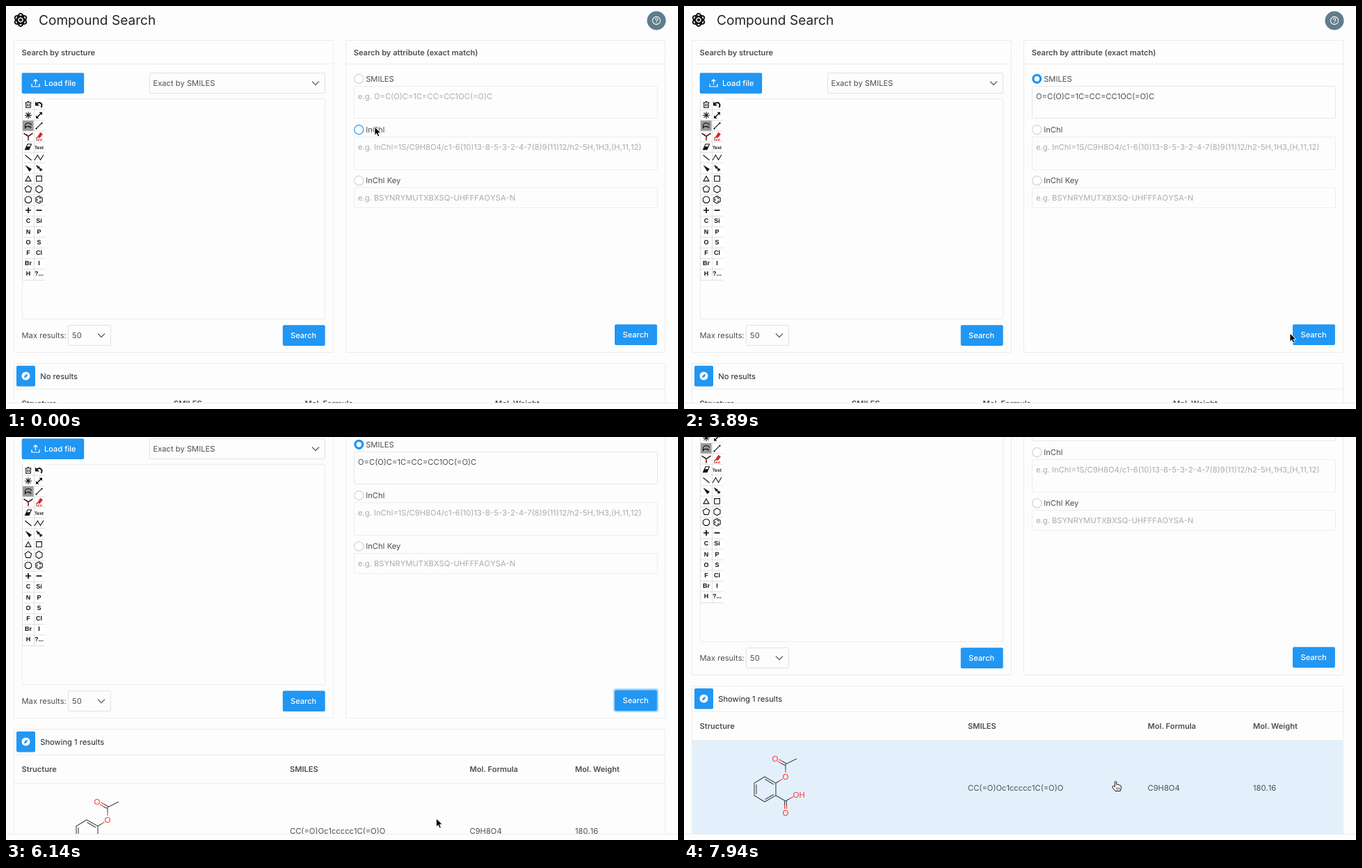
Animation, 966 px wide and 580 px high, one loop 7.96 s. Source, as an HTML page:

```html
<!DOCTYPE html>
<html lang="en">
<head>
<meta charset="utf-8">
<title>Compound Search</title>
<style>
  html, body { margin: 0; width: 100%; height: 100%; overflow: hidden; background: #fdfdfd; }
  svg { display: block; }
  text { font: 11.2px Inter, sans-serif; fill: #495057; white-space: pre; text-rendering: geometricPrecision; }
  .bold { font-weight: 600; font-size: 11.1px; }
  .title { font-size: 19.1px; fill: #212529; }
  .dark { fill: #212529; }
  .white { fill: #fff; font-weight: 500; font-size: 11.1px; }
  .hint { fill: #a7acb1; }
  .hint, .formula { font-kerning: none; }
  .atom { font: bold 9px "Liberation Sans", Arial, sans-serif; fill: #111; text-anchor: middle; }
  .oxygen { font: 11.5px "Liberation Sans", Arial, sans-serif; fill: #f33; }
</style>
</head>
<body>
<svg id="stage" width="966" height="580" viewBox="0 0 966 580"></svg>
<script>
const LOOP = 7960;
const BLUE = '#2196f3';
const stage = document.getElementById('stage');

// ---- drawing helpers ----
const text = (x, y, s, cls = '', id = '') => `<text x="${x}" y="${y}" class="${cls}" id="${id}">${s}</text>`;
const box = (x, y, w, h, stroke = '#ececee', fill = 'none', id = '') =>
  `<rect x="${x + .5}" y="${y + .5}" width="${w - 1}" height="${h - 1}" rx="1.5" stroke="${stroke}" fill="${fill}" id="${id}"/>`;
const path = (d, color = '#111', width = 1.1, fill = 'none') =>
  `<path d="${d}" stroke="${color}" stroke-width="${width}" fill="${fill}"/>`;
const solid = d => path(d, 'none', 0, '#111');
const at = (x, y, body) => `<g transform="translate(${x} ${y})">${body}</g>`;
const chevron = (x, y) => at(x, y, path('M-5 -2.5L0 2.5 5 -2.5', '#5d656d', 1.3));
const button = (x, y, w, label, labelX, id = '') =>
  `<rect id="${id}" x="${x}" y="${y}" width="${w}" height="29.7" rx="2" fill="${BLUE}"/>` + text(labelX, y + 19, label, 'white');
const radio = (y, label, id) =>
  `<circle id="${id}" cx="507.3" cy="${y}" r="6.6" fill="#fff" stroke="#ced4da" stroke-width="1.2"/>` + text(517.2, y + 4, label);
const polygon = (n, r, turn = 0) => {
  const points = Array.from({ length: n }, (_, i) => {
    const a = (i + turn) / n * 2 * Math.PI - Math.PI / 2;
    return `${(r * Math.cos(a)).toFixed(2)} ${(r * Math.sin(a)).toFixed(2)}`;
  });
  return path(`M${points.join('L')}Z`);
};

function palette() {
  const letter = (s, size = 9) => `<text class="atom" y="3.2" style="font-size:${size}px">${s}</text>`;
  const cells = [
    path('M-4.5 -3H4.5M-3.3 -3V4.3H3.3V-3M-1.5 -4.5H1.5M-1.2 -1V2.5M1.2 -1V2.5'),
    solid('M-5.5 1.5V-4.5L.5 1.5Z') + path('M-3 -1.5C1 -5 6 -1 3 4', '#111', 2),
    path('M-5 0H5M0 -5V5M-3.5 -3.5L3.5 3.5M-3.5 3.5L3.5 -3.5'),
    path('M-3 3L3 -3', '#111', 1.6) + solid('M4.5 -4.5V0L0 -4.5ZM-4.5 4.5V0L0 4.5Z'),
    path('M-4.5 4V0C-5 -5 4.5 -5 4.5 -1M-4.5 3C-3 0 0 1 1 2') + solid('M0 -1L5 2 3 2.5 4 5Z'),
    path('M-4 4L4 -4') + solid('M-5 3h2v2h-2zM3 -5h2v2h-2z'),
    path('M-6.5 -4.5L0 0 6.5 -4.5M0 0V6', '#111', 1.3) + path('M-2 -3L0 0V5', '#d22', 1),
    path('M-2 1L2 -5.5 5 -3 1 2Z', '#d22', .8, '#d22') + path('M-2 1L-4 3') +
      '<text class="atom" y="6" style="font-size:4px;fill:#d22">NEW</text>',
    path('M-4.5 4L-1 -4H4.5L1 4Z') + solid('M-4.5 4L-2.5 -.5H3L1 4Z'),
    letter('Text', 6.5),
    path('M-4.5 -3.5L4.5 4'),
    path('M-6.5 4L-2 -3.5 2 3.5 6.5 -4'),
    solid('M-4.5 -4.5L5 1.5 1.5 5Z'),
    path('M-4 -4L4.5 3.5') + solid('M-4 -4L1.5 -1.5 -1.5 1.5ZM0 0L5 1.5 1.5 5Z'),
    path('M0 -3.5L4 3.5H-4Z'),
    path('M-3.8 -3.8H3.8V3.8H-3.8Z'),
    polygon(5, 5), polygon(6, 5.2), polygon(8, 5, .5),
    polygon(6, 5.4) + path('M-2.8 -1.6V1.6M0 -3.2L2.8 -1.6M0 3.2L2.8 1.6'),
    path('M-4 0H4M0 -4V4', '#111', 1.7), path('M-4 0H4', '#111', 1.7),
    ...'C Si N P O S F Cl Br I H ?...'.split(' ').map(s => letter(s))
  ];
  let grid = 'M23.5 133V394.5H56M40.5 133V394';
  for (let row = 1; row < 17; row++) grid += `M23 ${134 + row * 15.3}H56`;
  return `<path d="M23 133H56V394H23Z" fill="#fff"/><path d="M24 165H39.5V180H24Z" fill="#999"/>` +
    path(grid, '#d8d8d8', .8) +
    cells.map((icon, i) => at(i % 2 ? 47.5 : 32, 142 + 15.2 * (i >> 1), icon)).join('');
}

function molecule() {
  const grey = d => path(d, '#444', 1.1);
  const red = d => path(d, '#f33', 1.1);
  return grey('M116 645L132 654V672L116 681 101 672V654ZM104 670V656M116.5 648.5L129 656M129 670.5L116.5 677.5') +
    grey('M132 654L137 651M146 627V634M146 627L162 619M146.8 625.8L141 622.5M145.2 628.6L139.5 625.4') +
    red('M137 651L141.5 648.3M146 634V639M141 622.5L136.5 620M139.5 625.4L135 622.8') +
    grey('M132 672L146 680M146 680L152 676.5M144.6 680V686M147.4 680V686') +
    red('M152 676.5L157 673.7M144.6 686V691M147.4 686V691') +
    text(126.6, 623, 'O', 'oxygen') + text(141.6, 649, 'O', 'oxygen') +
    text(156.5, 675, 'OH', 'oxygen') + text(141.6, 701, 'O', 'oxygen');
}

const headings = xs => ['Structure', 'SMILES', 'Mol. Formula', 'Mol. Weight']
  .map((s, i) => text(xs[i], 576, s, 'bold')).join('');
const electrons = [0, 60, 120].map(a =>
  `<ellipse rx="4.6" ry="9.2" transform="rotate(${a})" fill="none" stroke="#111" stroke-width="2"/>`).join('');

stage.innerHTML = `
<clipPath id="view"><path d="M0 0H966V571H0Z"/></clipPath>
<g clip-path="url(#view)"><g id="page">
  ${at(21, 20, electrons + '<circle r="2.2" fill="#111"/>')}
  ${text(47, 27, 'Compound Search', 'title')}
  <circle cx="935" cy="21" r="13.5" fill="#607d8b"/>
  <circle cx="935" cy="21" r="5.6" fill="none" stroke="#fff" stroke-width="1.1"/>
  ${path('M933.2 19.8C933.2 17.2 936.8 17.2 936.8 19.6C936.8 21 935 21 935 22.3M935 23.3V24.5', '#fff')}

  ${box(11, 49, 460, 450)}${box(11, 49, 460, 35)}
  ${box(488, 49, 460, 450)}${box(488, 49, 460, 35)}
  ${text(22.5, 71, 'Search by structure', 'bold')}
  ${text(499.7, 71, 'Search by attribute (exact match)', 'bold')}
  ${button(22.7, 96.3, 89.5, 'Load file', 55)}
  ${at(42.5, 111, path('M0 2V-5M-3 -2.3L0 -5.3 3 -2.3M-5.5 1V5H5.5V1', '#fff', 1.2))}
  ${box(206, 96, 253, 30, '#e0e2e5')}${text(211.5, 115, 'Exact by SMILES')}${chevron(445, 111)}
  ${box(23, 133, 436, 318)}${palette()}
  ${text(22.5, 478, 'Max results:')}
  ${box(89, 459, 62, 30, '#e0e2e5')}${text(95, 478, '50')}${chevron(137, 474)}
  ${button(397.8, 459.2, 60.9, 'Search', 409)}

  ${radio(104.8, 'SMILES', 'smilesRadio')}${radio(178, 'InChI', 'inchiRadio')}${radio(251.3, 'InChI Key', 'keyRadio')}
  <rect id="fieldRing" x="499" y="114" width="439" height="49" rx="3" fill="none" stroke="#a6d5fa" stroke-width="2.2"/>
  ${box(500, 115, 437, 47, '#ebedef', '#fdfdfd', 'field')}
  ${text(506, 134, '', 'formula', 'fieldText')}
  ${box(500, 188, 437, 48, '#ebedef')}
  ${text(506, 207, 'e.g. InChI=1S/C9H8O4/c1-6(10)13-8-5-3-2-4-7(8)9(11)12/h2-5H,1H3,(H,11,12)', 'hint')}
  ${box(500, 261, 437, 30, '#ebedef')}
  ${text(506, 280, 'e.g. BSYNRYMUTXBXSQ-UHFFFAOYSA-N', 'hint')}
  <rect id="buttonRing" x="874" y="457" width="63" height="32" rx="3" fill="none" stroke="#a6d5fa" stroke-width="2.2"/>
  ${button(875, 458.3, 60.9, 'Search', 886.5, 'searchButton')}

  <rect id="resultRow" x="11" y="592" width="937" height="138"/>
  ${box(11, 514, 937, 216, '#ececee', 'none', 'resultBox')}${path('M11 551.5H948', '#ececee', 1)}
  <rect x="15" y="517.7" width="27" height="29.7" rx="2" fill="${BLUE}"/>
  ${at(28.5, 532.5, `<circle r="6" fill="#fff"/>` + path('M3 -3L1.2 1.2 -3 3 -1.2 -1.2Z', 'none', 0, BLUE))}
  ${text(49.3, 537, '', 'dark', 'summary')}
  <g id="emptyTable">${headings([22.5, 241, 429.5, 703])}</g>
  <g id="spinner" transform="translate(479.5 570) scale(.75)">
    <circle id="arc" r="20" fill="none" stroke-width="7.5" stroke-linecap="round"/>
  </g>
  <g id="fullTable">
    ${headings([22.5, 408, 666.5, 818])}${path('M11 592.5H948', '#ececee', 1)}
    ${molecule()}
    ${text(408, 665, 'CC(=O)Oc1ccccc1C(=O)O', 'formula')}${text(666.5, 665, 'C9H8O4')}${text(818, 665, '180.16', 'formula')}
  </g>
</g></g>
${path('M0 571.5H966', '#ececee', 1)}
<g id="pointer">
  <g id="arrow">${path('M0 0V12.2L2.8 9.6 4.7 14 6.9 13 5 8.8H8.8Z', '#fff', .9, '#000')}</g>
  <g id="beam">${path('M-2 -6Q0 -6 0 -4V4Q0 6 -2 6M2 -6Q0 -6 0 -4V4Q0 6 2 6', '#222', 1)}</g>
  <g id="hand">${path('M-1.2 8.5V1.2Q0 -.4 1.2 1.2V5.2Q2.5 4.4 3.4 5.6 4.8 5 5.6 6.2 7.6 5.8 7.8 7.8V10.5L6.6 14.5H-.5L-4.8 9Q-4.6 6.8 -2.8 7.4Z', '#111', 1, '#fff')}
    ${path('M1.4 9.5V12.5M3.4 9.5V12.5M5.4 9.5V12.5', '#111', .8)}</g>
</g>`;

// ---- timeline ----
const pointerKeys = [
  [0, 530, 174], [150, 530, 174], [450, 531, 160], [900, 523, 100], [1200, 522, 98],
  [1350, 530, 110], [1500, 560, 128], [1650, 566, 130], [2100, 566, 130], [2250, 600, 150],
  [2400, 650, 195], [2540, 685, 236], [2690, 690, 300], [2840, 685, 380], [2990, 674, 437],
  [3140, 678, 440], [3290, 705, 450], [3590, 810, 465], [3890, 871, 471], [4190, 880, 472],
  [4340, 879, 473], [4640, 770, 505], [4940, 618, 549], [7190, 619, 549], [7490, 607, 538],
  [7790, 607, 538], [7940, 620.5, 495]
];
const scrollKeys = [
  [4790, 0], [5090, 20], [5540, 20], [5690, 34], [6140, 94], [6440, 140], [6740, 160], [7190, 160], [7490, 156]
];

function valueAt(keys, t, i = 1) {
  const next = keys.findIndex(k => k[0] > t);
  if (next === 0) return keys[0][i];
  if (next < 0) return keys[keys.length - 1][i];
  const a = keys[next - 1], b = keys[next];
  return a[i] + (b[i] - a[i]) * (t - a[0]) / (b[0] - a[0]);
}

function stepped(t) {
  if (t < 300) return 0;
  const start = t < 2540 ? 0 : 2540;
  return start + Math.floor((t - start) / 150) * 150;
}

const el = id => document.getElementById(id);
const set = (id, attrs) => Object.entries(attrs).forEach(([k, v]) => el(id).setAttribute(k, v));
const show = (id, on) => { el(id).style.display = on ? '' : 'none'; };
const smooth = x => x * x * (3 - 2 * x);

function drawSpinner(ms) {
  const phase = ms % 1500 / 750;
  const grow = smooth(Math.min(phase, 1)), chase = smooth(Math.max(phase - 1, 0));
  const mix = smooth(Math.min(ms / 3000, 1));
  const color = [[214, 0], [45, 87], [32, 231]].map(([a, b]) => Math.round(a + (b - a) * mix));
  set('arc', {
    stroke: `rgb(${color})`,
    'stroke-dasharray': `${1 + 88 * grow} 200`,
    'stroke-dashoffset': -35 * grow - 89 * chase,
    transform: `rotate(${20 + ms * .18})`
  });
}

function render(t) {
  const x = valueAt(pointerKeys, t, 1), y = valueAt(pointerKeys, t, 2);
  const selected = t >= 1200, focused = t >= 1500 && t < 2990, filled = t >= 1950;
  const loading = t >= 4190 && t < 5540, found = t >= 5540;
  const rowHover = t >= 6440, rowPicked = t >= 7040;
  const overField = t >= 1500 && t < 2400, overSearch = t >= 4190 && t < 4490;

  set('page', { transform: `translate(0 ${-valueAt(scrollKeys, t)})` });
  set('pointer', { transform: `translate(${x} ${y})` });
  show('hand', rowHover);
  show('beam', overField);
  show('arrow', !rowHover && !overField);

  set('inchiRadio', { stroke: t < 450 ? BLUE : '#ced4da' });
  set('smilesRadio', selected
    ? { stroke: BLUE, 'stroke-width': 3.4, r: 5.4 }
    : { stroke: t >= 900 ? BLUE : '#ced4da', 'stroke-width': 1.2, r: 6.6 });

  show('fieldRing', focused);
  set('field', { stroke: focused ? BLUE : selected ? '#e4e6e9' : '#ebedef' });
  el('fieldText').textContent = (filled ? '' : 'e.g. ') + 'O=C(O)C=1C=CC=CC1OC(=O)C';
  el('fieldText').style.fill = filled ? '#495057' : selected ? '#7b838a' : '#a7acb1';

  show('buttonRing', t >= 4190 && !rowPicked);
  set('searchButton', { fill: overSearch ? '#0d89ec' : BLUE });

  el('summary').textContent = found ? 'Showing 1 results' : 'No results';
  show('emptyTable', !loading && !found);
  show('spinner', loading);
  show('fullTable', found);
  set('resultBox', { height: loading ? 75 : 216 });
  set('resultRow', { fill: rowPicked ? '#e3f0fb' : rowHover ? '#e9e9ed' : 'none' });
  if (loading) drawSpinner(t - 4140);
}

const started = performance.now();
function tick() {
  render(stepped((performance.now() - started) % LOOP));
  requestAnimationFrame(tick);
}
tick();
</script>
</body>
</html>
```
